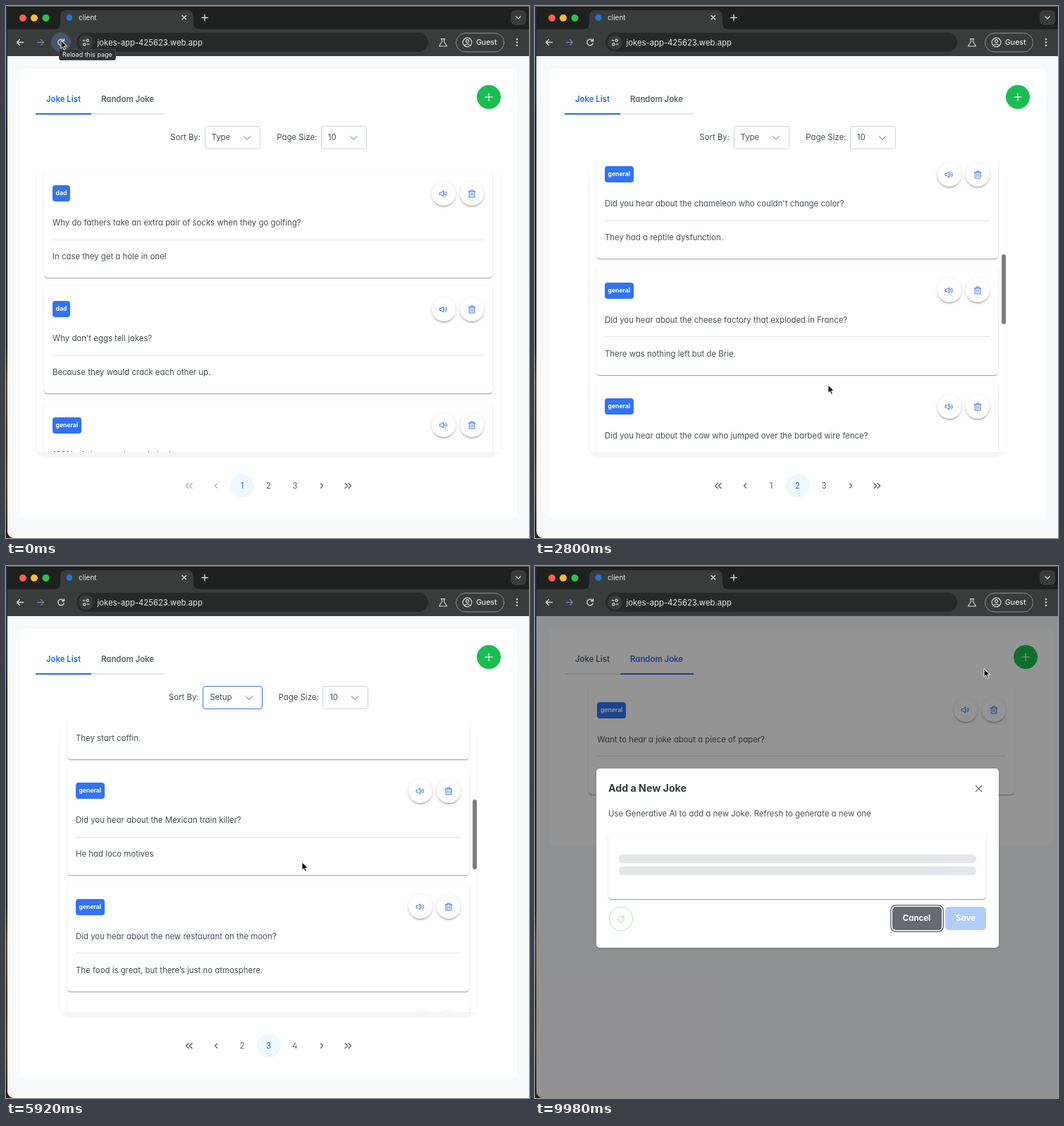
These frames come from a looping animation (742x754 px, 10 s). An HTML page:

```html
<!DOCTYPE html>
<html lang="en">
<head>
<meta charset="utf-8">
<title>Joke list</title>
<style>
html, body { margin: 0; width: 100%; height: 100%; overflow: hidden; background: #1b1d24; }
#stage { position: absolute; left: 0; top: 0; width: 742px; height: 754px; overflow: hidden;
  background: linear-gradient(#20283a 0, #1d3560 12%, #1a1e2a 24%, #1c1d22 64%, #5b4315 71%, #3a2c12 82%, #4d3a16 90%, #1c1a18);
  font: 11.4px/16px Inter, "Open Sans", sans-serif; color: #495057;
  font-feature-settings: "cv02", "cv03", "cv04", "cv11"; }
#stage div, #stage span, #stage svg { position: absolute; box-sizing: border-box; }
span { white-space: nowrap; }
svg { fill: none; stroke-linecap: round; stroke-linejoin: round; overflow: visible; }
#win { left: 2px; top: 0; width: 740px; height: 754px; background: #f8f9fb; border-radius: 0 0 0 9px; overflow: hidden; }
#chrome { left: 0; top: 0; }
#chrome text { stroke: none; fill: #e6e6e6; font-feature-settings: normal; }
#sheet { left: 20px; top: 89px; background: #fff; border-radius: 6px; }
.bold { font-weight: 600; }
.rule { height: 1px; background: #dee2e6; }
#line { left: 22px; top: 62.5px; width: 183px; height: 2px; background: #dfe3e7; }
#bar { top: 62.5px; height: 2px; background: #2b6de3; }
.round { width: 34px; height: 34px; border-radius: 50%; }
#plus { right: 23px; top: 23px; background: #1cbc52; }
.card { border-radius: 5px; background: #fff;
  box-shadow: 0 2px 1px -1px #0003, 0 1px 1px #00000024, 0 1px 3px #0000001f; }
.joke { height: 153px; }
.joke .badge { left: 12px; top: 22px; height: 23px; padding: 0 4.6px; border-radius: 4px; background: #3173f4;
  color: #fff; font: 700 8.55px/23px Inter, sans-serif; }
.joke .setup { left: 12px; top: 67px; }
.joke .rule { left: 12px; right: 12px; top: 98.5px; }
.joke .punch { left: 12px; top: 115px; }
.joke .round { top: 16.5px; background: #fff; box-shadow: 0 3px 1px -2px #0003, 0 2px 2px #00000024, 0 1px 5px #0000001f; }
.joke svg { left: 11px; top: 11px; stroke: #3a73df; }
.say { right: 52px; }
.del { right: 12px; }
#random { left: 0; top: 0; right: 0; height: 100%; }
#random .joke { left: calc(5% + 20.5px); right: calc(5% + 20.5px); top: 81.5px; }
#get { left: calc(50% - 69.5px); top: 251.5px; width: 139px; height: 33px; border-radius: 17px; background: #1cbc52;
  color: #fff; font-weight: 700; line-height: 33px; text-align: center; }
.tools { left: 22px; width: 701px; top: 170px; height: 33px; display: flex; justify-content: center; }
#stage .tools span { position: relative; line-height: 33px; margin-right: 5.5px; }
#stage .tools .pick { border: 1px solid #ced4da; border-radius: 4px; line-height: 31px; padding: 0 42px 0 9px; margin-right: 23px; }
#stage .tools .pick:last-child { margin: 0; }
.pick svg { right: 12px; top: 9.5px; stroke: #5c6670; }
.focus { border-color: #3b74e0 !important; }
.panel { left: 75px; width: 594px; top: 220px; height: 420px; border-radius: 0 0 22px 22px / 0 0 12px 12px;
  background: linear-gradient(#fff 8px, #f6f6f7 30px); }
.wide { left: 42px; width: 660px; }
.view { left: 1.5px; right: 1.5px; top: 0; height: 412px; background: #fff; overflow: hidden; }
.roll { left: 0; right: 0; top: 12px; }
.roll > div { left: 10.5px; right: 10.5px; }
.bone { height: 45.5px; border-radius: 5px; background: #e5e7e7; }
#thumb { left: 661.5px; top: 220px; width: 6px; height: 99px; border-radius: 3px; background: #7c7d7f; }
.pager { left: 0; top: 662.5px; width: 742px; height: 34px; }
.pager span { width: 34px; line-height: 34px; text-align: center; border-radius: 50%; color: #5c646d; }
.pager .on { background: #eff7ff; color: #2b6de3; }
.pager svg { top: 11px; stroke: #4d5560; stroke-width: 1.2; }
.pager .off { stroke: #a6abb1; }
#menu { left: 280px; top: 211px; width: 80px; height: 95px; border-radius: 4px; background: #fff; box-shadow: 0 2px 6px 3px #0000001c; }
#menu div { left: 0; width: 80px; height: 29px; line-height: 29px; padding-left: 14px; }
#blank, #mask { left: 2px; top: 71px; width: 740px; height: 683px; background: #fff; border-radius: 0 0 0 9px; }
#mask { background: #0000006b; }
.box { background: #fff; border-radius: 5px; box-shadow: 0 1px 3px #0003; }
.box h2 { position: absolute; margin: 0; left: 17px; top: 18px; font: 700 14.2px/20px Inter, sans-serif; color: #343a42; white-space: nowrap; }
.btn { height: 33px; line-height: 33px; border-radius: 5px; color: #fff; font-weight: 700; text-align: center; }
#ask { left: 244px; top: 336px; width: 256px; height: 153px; }
#add { left: 87px; top: 286.5px; width: 571px; height: 253.5px; }
.load { left: 14.5px; width: 507px; height: 11.5px; border-radius: 5px; background: linear-gradient(90deg, #e4e6e7 85%, #e6e6ee 93%); }
#cur { left: 0; top: 0; }
</style>
</head>
<body>
<div id="stage"></div>
<script>
const icon = (d, style = '', cls = '', size = 12) =>
  `<svg class="${cls}" width="${size}" height="${size}" viewBox="0 0 12 12" style="${style}"><path d="${d}"/></svg>`;
const text = (x, mid, s, cls = '', id = '') =>
  `<span id="${id}" class="${cls}" style="left:${x}px;top:${mid - 8}px">${s}</span>`;

const VOLUME = 'M.5 4.4h2l3-2.4v8l-3-2.4h-2zM7.5 4.4q1.2 1.6 0 3.2M9.2 2.8q2.6 3.2 0 6.4';
const TRASH = 'M1 3h10M4.2 3V1h3.6v2M2.2 3v8h7.6V3M4.8 5.2v3.6M7.2 5.2v3.6';
const CROSS = 'M1.5 1.5l9 9m0-9l-9 9', DOWN = 'M1.2 3.6L6 8.4l4.8-4.8', PLUS = 'M6 .8v10.4M.8 6h10.4';
const LEFT = 'M7.5 3L4.5 6l3 3', RIGHT = 'M4.5 3l3 3-3 3';
const LEFT2 = 'M5 2.5L1.5 6 5 9.5M10 2.5L6.5 6l3.5 3.5', RIGHT2 = 'M2 2.5L5.5 6 2 9.5M7 2.5L10.5 6 7 9.5';

const joke = ([setup, punch, type = 'general'], top) => `<div class="card joke" style="${top == null ? '' : `top:${top}px`}">
  <span class="badge">${type}</span><span class="setup">${setup}</span><div class="rule"></div><span class="punch">${punch}</span>
  <div class="round say">${icon(VOLUME)}</div><div class="round del">${icon(TRASH)}</div></div>`;
const panel = (id, body, cls = '') =>
  `<div class="panel ${cls}" id="${id}"><div class="view"><div class="roll">${body}</div></div></div>`;
const list = (id, jokes, cls) => panel(id, jokes.map((j, i) => joke(j, i * 164.4)).join(''), cls);

const heard = (a, b) => ['Did you hear about the ' + a + '?', b];
const first = [
  ['Why do fathers take an extra pair of socks when they go golfing?', 'In case they get a hole in one!', 'dad'],
  ["Why don't eggs tell jokes?", 'Because they would crack each other up.', 'dad'],
  ['100% of sleepers dream in bed', 'The rest are wide awake.']];
const second = [
  ['Can a kangaroo jump higher than a tall building?', "Of course. Buildings can't jump."],
  heard('actor who fell through the floor', 'He was going through a stage.'),
  heard('bread factory burning down', 'They say the business is toast.'),
  heard("chameleon who couldn't change color", 'They had a reptile dysfunction.'),
  heard('cheese factory that exploded in France', 'There was nothing left but de Brie.'),
  heard('cow who jumped over the barbed wire fence', 'It was udder destruction.'),
  heard('guy who invented the knock-knock joke', 'He won the no-bell prize.')];
const third = [
  heard('Mexican train killer', 'He had loco motives'),
  heard('new restaurant on the moon', 'The food is great, but there’s just no atmosphere.'),
  heard('runner who was criticized', 'He just took it in stride'),
  ['Do I enjoy making courthouse puns?', 'Guilty'],
  ['Do you want a brief explanation of what an acorn is?', "In a nutshell, it's an oak tree."],
  ['How can you tell a vampire has a cold?', 'They start coffin.']];
const sorted = [...third.slice(3), ...third.slice(0, 3)];
const bones = [...Array(10)].map((_, i) => `<div class="bone" style="top:${i * 57}px"></div>`).join('');

const tools = (id, sort) => `<div class="tools" id="${id}"><span>Sort By:</span>
  <span class="pick">${sort}${icon(DOWN)}</span><span>Page Size:</span><span class="pick">10${icon(DOWN)}</span></div>`;
const pager = (id, from, on) => {
  const arrow = (d, x, off) => icon(d, `left:${x - 6}px`, off ? 'off' : '');
  const nums = [0, 1, 2].map(i =>
    `<span class="${i == on ? 'on' : ''}" style="left:${318 + i * 37.5}px">${from + i}</span>`).join('');
  return `<div class="pager" id="${id}">${arrow(LEFT2, 260, !on)}${arrow(LEFT, 297.5, !on)}${nums}${arrow(RIGHT, 447.5)}${arrow(RIGHT2, 484.5)}</div>`;
};

const chrome = `<svg id="chrome" width="742" height="71" stroke="#d6d6d6" stroke-width="1.4" font-family="Inter, sans-serif">
  <g stroke="none">
    <path fill="#1f2020" d="M2 0h740v40H2z"/><path fill="#555" d="M2 0h740v1H2z"/>
    <path fill="#3a3b3b" d="M2 33h66q9 0 9-9v-9q0-9 9-9h171q9 0 9 9v9q0 9 9 9h467v38H2z"/>
    <rect x="100" y="38" width="499" height="27" rx="13.5" fill="#272828"/>
    <circle cx="24" cy="17" r="5" fill="#ff5f57"/><circle cx="40" cy="17" r="5" fill="#febc2e"/><circle cx="56.5" cy="17" r="5" fill="#28c840"/>
    <circle cx="90" cy="16.5" r="4.5" fill="#2673cf"/><circle cx="113.5" cy="51.5" r="10.5" fill="#3a3b3b"/>
    <rect x="716" y="6" width="22" height="21" rx="6" fill="#3a3b3b"/>
    <circle id="hover" cx="78" cy="51.5" r="14" fill="#46546c"/>
  </g>
  <path d="M250 13.5l5.6 5.6m0-5.6l-5.6 5.6M282 12.2v8.6M277.7 16.5h8.6M724 15l3 3 3-3"/>
  <path d="M24.5 51.5h-9m4-4l-4 4 4 4"/><path stroke="#6f7f9b" d="M44.500 51.500h9m-4-4l4 4-4 4"/>
  <path d="M82 49.500a4.300 4.300 0 1 0 .2 3.400M82.500 46.800v3h-3"/>
  <path stroke-width="1.200" d="M109 48.800h3M115 54.200h3"/><g stroke-width="1.200"><circle cx="115.700" cy="48.800" r="1.600"/><circle cx="111.300" cy="54.200" r="1.600"/></g>
  <path stroke-width="1.200" d="M617 46.500h6M618.500 46.500v4l-4 6.500h11l-4-6.500v-4"/>
  <rect x="638.500" y="38.500" width="68" height="26.500" rx="13.200" stroke="#8d8f91" stroke-width="1"/>
  <g stroke-width="1.200"><circle cx="654.500" cy="51.500" r="6.300"/><circle cx="654.500" cy="49.700" r="2.100"/><path d="M650.300 55.800q4.200-3.200 8.400 0"/></g>
  <path stroke-width="2.600" d="M725 47h0M725 51.500h0M725 56h0"/>
  <text x="103" y="20" font-size="10">client</text>
  <text x="129.500" y="55.500" font-size="11.300">jokes-app-425623.web.app</text>
  <text x="667" y="55.300" font-size="10.500" font-weight="500">Guest</text>
</svg>
<svg id="tip" width="742" height="80" style="left:0;top:0"><rect x="75.500" y="61.500" width="80" height="15" rx="2" fill="#313233" stroke="#4b4c4d"/>
  <text x="80" y="72" font-size="9" fill="#f0f0f0" style="font-feature-settings:normal">Reload this page</text></svg>`;

const ask = `<div class="box" id="ask"><h2>Confirmation</h2>${icon(CROSS, 'left:229px;top:20px;stroke:#6b7280', '', 10)}
  <svg width="18" height="18" viewBox="0 0 18 18" style="left:20px;top:60px;stroke:#4b5563;stroke-width:1.4"><circle cx="9" cy="9" r="8"/><path d="M9 5v5M9 13h0"/></svg>
  ${text(46, 69, 'Do you want to delete this joke?')}
  <div class="btn" style="left:142px;top:107px;width:44px;color:#2b6de3">No</div>
  <div class="btn" style="left:191px;top:107px;width:48px;background:#3173f4">Yes</div></div>`;
const add = `<div class="box" id="add"><h2>Add a New Joke</h2>${icon(CROSS, 'left:536.5px;top:23px;stroke:#5c646d;stroke-width:1.4', '', 11)}
  ${text(17, 64, 'Use Generative AI to add a new Joke. Refresh to generate a new one')}
  <div class="card" style="left:17px;top:92.5px;width:536px;height:92px"><div class="load" style="top:29.5px"></div><div class="load" style="top:46.5px"></div></div>
  <div class="round" style="left:17.5px;top:196px;border:1px solid #abe2bf">${icon('M9.8 4.2A4.4 4.4 0 1 0 10.400 6.500M10 1.500v2.900H7.100', 'left:10px;top:10px;stroke:#a5e0ba')}</div>
  <div class="btn" style="left:419.5px;top:196px;width:70px;background:#646b73;box-shadow:0 0 0 1.5px #fff,0 0 0 3px #6b737b">Cancel</div>
  <div class="btn" style="left:495px;top:196px;width:58px;background:#b0cdfb">Save</div></div>`;

const cursor = `<svg id="cur" width="20" height="20" stroke="#fff" stroke-width="1">
  <path id="arrow" fill="#000" d="M0 0v11.200l2.600-2.400 1.900 4.400 2-.9-1.900-4.200h3.600z"/>
  <path id="hand" fill="#fff" stroke="#222" d="M-1 1.200q0-1.300 1.100-1.300t1.100 1.300v3.600l.2-.6q1.700-.5 1.900.8 1.600-.5 1.900.8 1.700-.3 1.700 1.100v2.600q0 2.600-1.600 4.300H0q-1.200-2.200-3.400-4.800-.8-1.300.4-1.700 1-.2 2 1.200z"/></svg>`;

document.getElementById('stage').innerHTML = `<div id="win"></div>
  <div id="sheet"><div id="line"></div><div id="bar"></div>
    ${text(37, 43, 'Joke List', 'bold', 'tabList')}${text(115, 43, 'Random Joke', 'bold', 'tabRandom')}
    <div class="round" id="plus">${icon(PLUS, 'left:11px;top:11px;stroke:#fff;stroke-width:1.2')}</div>
    <div id="random">${joke(['Want to hear a joke about a piece of paper?', "Never mind...it's tearable"])}<div id="get">Get A Random Joke</div></div>
  </div>
  <div id="list">${tools('byType', 'Type')}${tools('bySetup', 'Setup')}
    ${list('one', first, 'wide')}${list('two', second)}${list('three', third)}${list('four', sorted)}${panel('wait', bones)}
    <div id="thumb"></div>${pager('pg1', 1, 0)}${pager('pg2', 1, 1)}${pager('pg3', 2, 1)}
    <div id="menu"><div style="top:1px;background:#d7eafd;color:#3b74e0">Type</div><div style="top:30px;background:#eee">Setup</div><div style="top:59px">Id</div></div>
  </div>
  <div id="blank"></div><div id="mask"></div>${ask}${add}${chrome}${cursor}`;
document.querySelector('#bySetup .pick').classList.add('focus');

// Timeline: each key is [ms, declarations] on a 10 s loop.
let css = '', count = 0;
const track = (sel, ease, keys) => {
  const name = 'k' + count++, frames = [...keys, [10000, keys[keys.length - 1][1]]];
  css += `@keyframes ${name}{${frames.map(([t, v]) => `${t / 100}%{${v}}`).join('')}}
    ${sel}{animation:${name} 10s ${ease} infinite}\n`;
};
const steps = (sel, ...keys) => track(sel, 'step-end', keys);
const show = (sel, ...times) =>
  steps(sel, ...(times[0] ? [[0, 'opacity:0']] : []), ...times.map((t, i) => [t, `opacity:${1 - i % 2}`]));
const fade = (sel, ...keys) => track(sel, 'linear', keys.map(([t, o]) => [t, `opacity:${o}`]));
const scroll = (sel, ...keys) => track(sel, 'linear', keys.map(([t, y]) => [t, `transform:translateY(${-y}px)`]));
const pop = (sel, ...keys) => track(sel, 'linear', keys.map(([t, o]) => [t, `opacity:${o};transform:scale(${.7 + .3 * o})`]));

show('#hover', 0, 300);
show('#tip', 0, 140);
show('#blank', 200, 360);
show('#list', 0, 6740);
show('#random', 6740);
show('#one', 0, 360, 640, 1600);
show('#two', 1800, 3040);
show('#three', 3190, 4780);
show('#four', 5280);
show('#pg1', 0, 1600);
show('#pg2', 1600, 3040);
show('#pg3', 3040);
show('#byType', 0, 4780);
show('#bySetup', 4780);
steps('#byType .pick:nth-child(2)', [0, 'border-color:#ced4da'], [4440, 'border-color:#3b74e0']);
steps('#tabList', [0, 'color:#2b6de3'], [6740, 'color:#5c646d']);
steps('#tabRandom', [0, 'color:#5c646d'], [6740, 'color:#2b6de3']);
steps('#bar', [0, 'left:22px;width:79px'], [6740, 'left:101px;width:104px']);
steps('#sheet', [0, 'width:705px;height:637px'], [6740, 'width:705px;height:307px'], [7760, 'width:716px;height:307px'],
  [9080, 'width:705px;height:307px'], [9560, 'width:716px;height:307px']);
show('#wait', 360, 640, 1600, 1800, 3040, 3190, 4780, 5280);
steps('#wait .roll', [0, 'transform:none'], [4780, 'transform:translateY(-170px)']);

scroll('#two .roll', [0, 0], [2180, 0], [2440, 370], [2640, 520]);
scroll('#three .roll', [0, 0], [3590, 0], [3600, 4.5], [3700, 90], [3900, 240], [4080, 290]);
scroll('#four .roll', [0, 170], [5420, 170], [5640, 380], [5900, 440]);
track('#thumb', 'linear', [[0, 0, 0], [2180, 0, 0], [2200, 7, 1], [2440, 94, 1], [2640, 132, 1], [2900, 132, 1], [3000, 132, 0],
  [3600, 1, 0], [3640, 10, 1], [3900, 60, 1], [4080, 73, 1], [4180, 73, 0], [5420, 43, 0], [5440, 48, 1], [5640, 96, 1],
  [5900, 111, 1], [6040, 111, 1], [6140, 111, 0]].map(([t, y, o]) => [t, `transform:translateY(${y}px);opacity:${o}`]));

fade('#menu', [0, 0], [4440, 0], [4540, 1], [4790, 1], [4890, 0]);
fade('#mask', [0, 0], [7760, 0], [7900, 1], [8930, 1], [9080, 0], [9560, 0], [9700, 1]);
pop('#ask', [0, 0], [7780, 0], [7930, 1], [8780, 1], [8910, 0]);
pop('#add', [0, 0], [9620, 0], [9780, 1]);

const hand = [1500, 1860, 2900, 3080, 4380, 5300, 6620, 6860, 7640, 8060, 8600, 8960, 9350, 9640];
show('#hand', ...hand);
show('#arrow', 0, ...hand);
const path = [[0, 78, 49], [160, 78, 49], [860, 400, 560], [1000, 400, 560], [1560, 371, 676], [1780, 371, 676], [2020, 419, 474],
  [2700, 419, 474], [2960, 409, 676], [3180, 409, 676], [3560, 518, 287], [4160, 518, 287], [4420, 320, 188], [4520, 320, 188],
  [4740, 323, 261], [5260, 323, 261], [5420, 420, 420], [6380, 420, 420], [6680, 172, 132], [6780, 172, 132], [7100, 700, 232],
  [7220, 687, 225], [7340, 664, 212], [7520, 664, 212], [7680, 642, 204], [8000, 642, 204], [8640, 476, 366], [8940, 476, 366],
  [9400, 686, 128], [9600, 686, 128], [9940, 637, 146]];
track('#cur', 'ease-in-out', path.map(([t, x, y]) => [t, `transform:translate(${x}px,${y}px)`]));

document.head.appendChild(document.createElement('style')).textContent = css;
</script>
</body>
</html>
```
